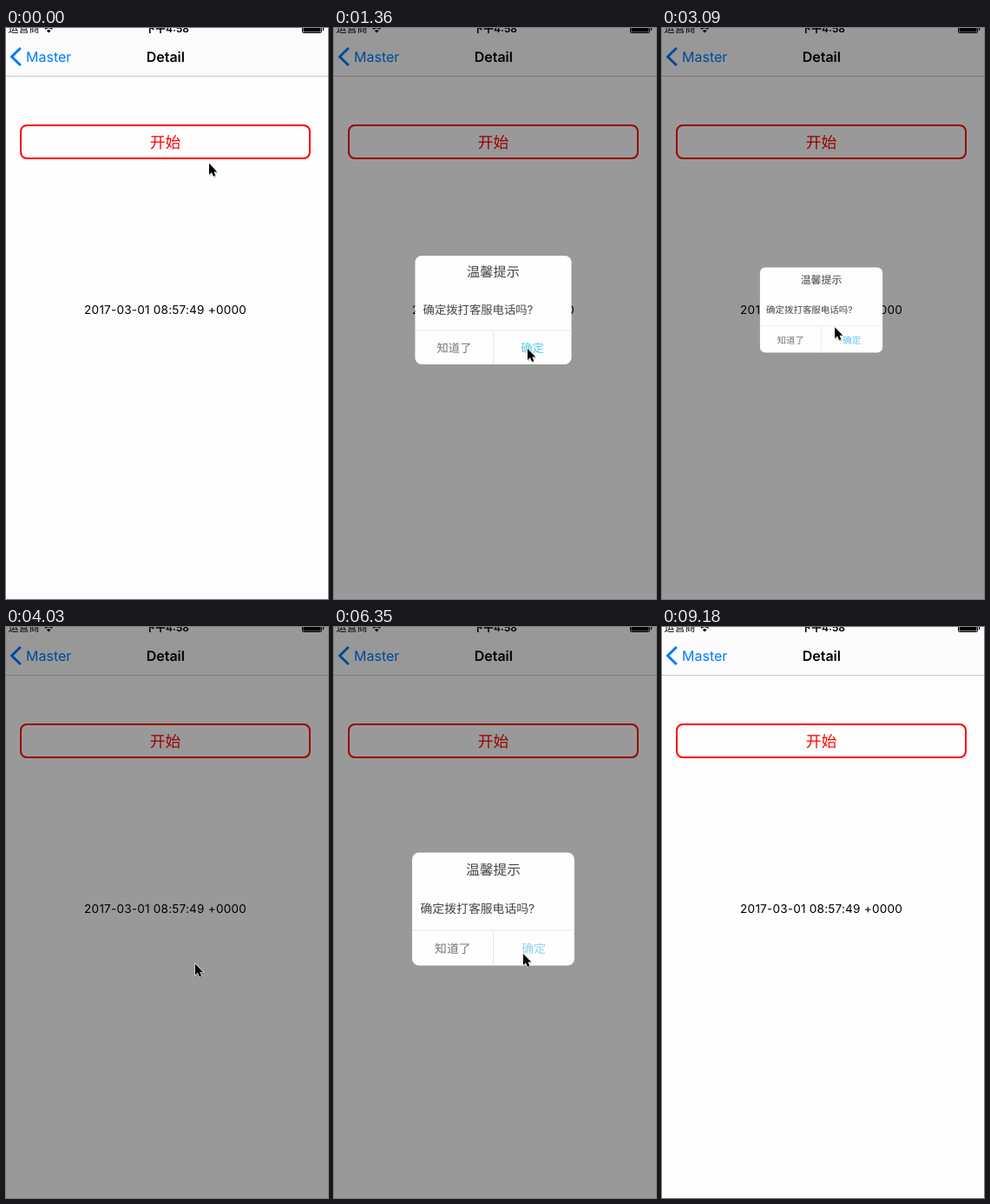
Recreate the animation shown at these times as an HTML page. Size 371 by 657 pixels, loop 9920 ms.

```html
<!DOCTYPE html>
<html lang="zh-CN">
<head>
<meta charset="utf-8">
<style>
html, body { margin: 0; width: 100%; height: 100%; overflow: hidden; background: #fefefe; }
svg { display: block; font: 13.85px Inter, "Noto Sans CJK SC", "Noto Sans CJK JP", sans-serif; text-rendering: geometricPrecision; }
.nav { font-size: 16px; }
.status { font-size: 12px; }
.date { font-size: 13.6px; letter-spacing: .2px; }
.mid { text-anchor: middle; }
</style>
</head>
<body>
<svg width="371" height="657" viewBox="0 0 371 657">
  <rect width="371" height="657" fill="#fefefe"/>
  <rect width="371" height="55" fill="#fcfcfc"/>
  <g class="status">
    <text x="2.5" y="5.3">运营商</text>
    <path d="M45 1.2a6 6 0 0 1 8.4 0" fill="none" stroke="#000" stroke-width="1.3"/>
    <path d="M46.9 3.2a3.3 3.3 0 0 1 4.6 0l-2.3 2.4z"/>
    <text x="185.5" y="5.3" class="mid" font-weight="600">下午4:58</text>
    <rect x="341.5" y="-5" width="22" height="10.5" rx="1" fill="none" stroke="#000"/>
    <path d="M342.5 0h20v4.5h-20zM365 0h1.2v3h-1.2z"/>
  </g>
  <path d="M0 55.5h371" stroke="#c9c9c9"/>
  <path d="M16.8 23L6.6 33l10.2 10" fill="none" stroke="#007aff" stroke-width="3"/>
  <text class="nav" x="23" y="39" fill="#007aff">Master</text>
  <text class="nav mid" x="183.8" y="39" font-weight="600">Detail</text>
  <rect x="17" y="112" width="333" height="38" rx="7" fill="none" stroke="#f00" stroke-width="2"/>
  <text class="mid" x="183.5" y="138" font-size="17.8" fill="#f00">开始</text>
  <text class="mid date" x="183.6" y="329.4">2017-03-01 08:57:49 +0000</text>

  <rect id="shade" width="371" height="657" opacity=".4"/>
  <g id="dialog">
    <rect x="-93.5" y="-65" width="187" height="130" rx="8" fill="#fefefe"/>
    <path d="M-93.5 24.5h187M0 24.5v40.5" stroke="#e6e6e6"/>
    <text class="mid" y="-39.8" font-size="15.8" fill="#444">温馨提示</text>
    <text x="-84" y="4.6" fill="#444">确定拨打客服电话吗?</text>
    <text class="mid" x="-46.7" y="50.4" fill="#777">知道了</text>
    <text class="mid" id="confirm" x="46.7" y="50.4">确定</text>
  </g>

  <g id="cursor">
    <path d="M.8 2v13l3-2.6 2 4.4 2.7-1.1-2-4.3h4z" opacity=".2"/>
    <path d="M0 0v13l2.9-2.7L5 15l2.4-1-2-4.4h3.9z" stroke="#fff" stroke-width="1.2" paint-order="stroke"/>
  </g>
</svg>
<script>
const LOOP = 9920, GLIDE = 520, SCALE = 400;
const [shade, dialog, confirmLabel, cursor] =
  ["shade", "dialog", "confirm", "cursor"].map(id => document.getElementById(id));

// When each dialog opens and when its button is pressed.
const alerts = [[400, 1220], [2820, 3570], [5400, 6350]];

// Pointer resting places: arrival time, x, y.
const stops = [
  [0, 234, 156], [260, 238, 138], [1080, 223, 369], [2580, 179, 134],
  [3360, 211, 378], [4530, 326, 460], [5220, 223, 141], [6000, 218, 376],
  [7170, 338, 336], [8080, 374, 392], [9180, 289, 660]
];

const clamp = v => Math.min(1, Math.max(0, v));
const smooth = u => u * u * (3 - 2 * u);
const easeOut = (u, power) => 1 - (1 - u) ** power;
const mix = (a, b, u) => a + (b - a) * u;

// The hand covers height faster than width, which bends its path.
function pointerAt(t) {
  const next = stops.findIndex(([arrival]) => arrival > t);
  if (next < 0) return [289, 660];
  const [left, x0, y0] = stops[next - 1], [arrival, x1, y1] = stops[next];
  const glide = Math.min(GLIDE, arrival - left);
  const u = clamp((t - arrival + glide) / glide);
  return [mix(x0, x1, easeOut(u, 1.5)), mix(y0, y1, easeOut(u, 3))];
}

function draw(now) {
  const t = now % LOOP;
  const grow = start => smooth(clamp((t - start) / SCALE));
  const [open, press] = alerts.findLast(([start]) => start <= t) || [LOOP, LOOP];
  const close = press + 95;
  const size = grow(open) - grow(close);
  shade.style.display = t >= open && t < close + SCALE + 40 ? "" : "none";
  dialog.style.display = size > .03 ? "" : "none";
  dialog.setAttribute("transform", `translate(183.5 324.5) scale(${size})`);
  confirmLabel.setAttribute("fill", t >= press && t < close + 30 ? "#8fd3ea" : "#58c4f4");
  cursor.setAttribute("transform", `translate(${pointerAt(t)})`);
  requestAnimationFrame(() => draw(performance.now()));
}
draw(0);
</script>
</body>
</html>
```
